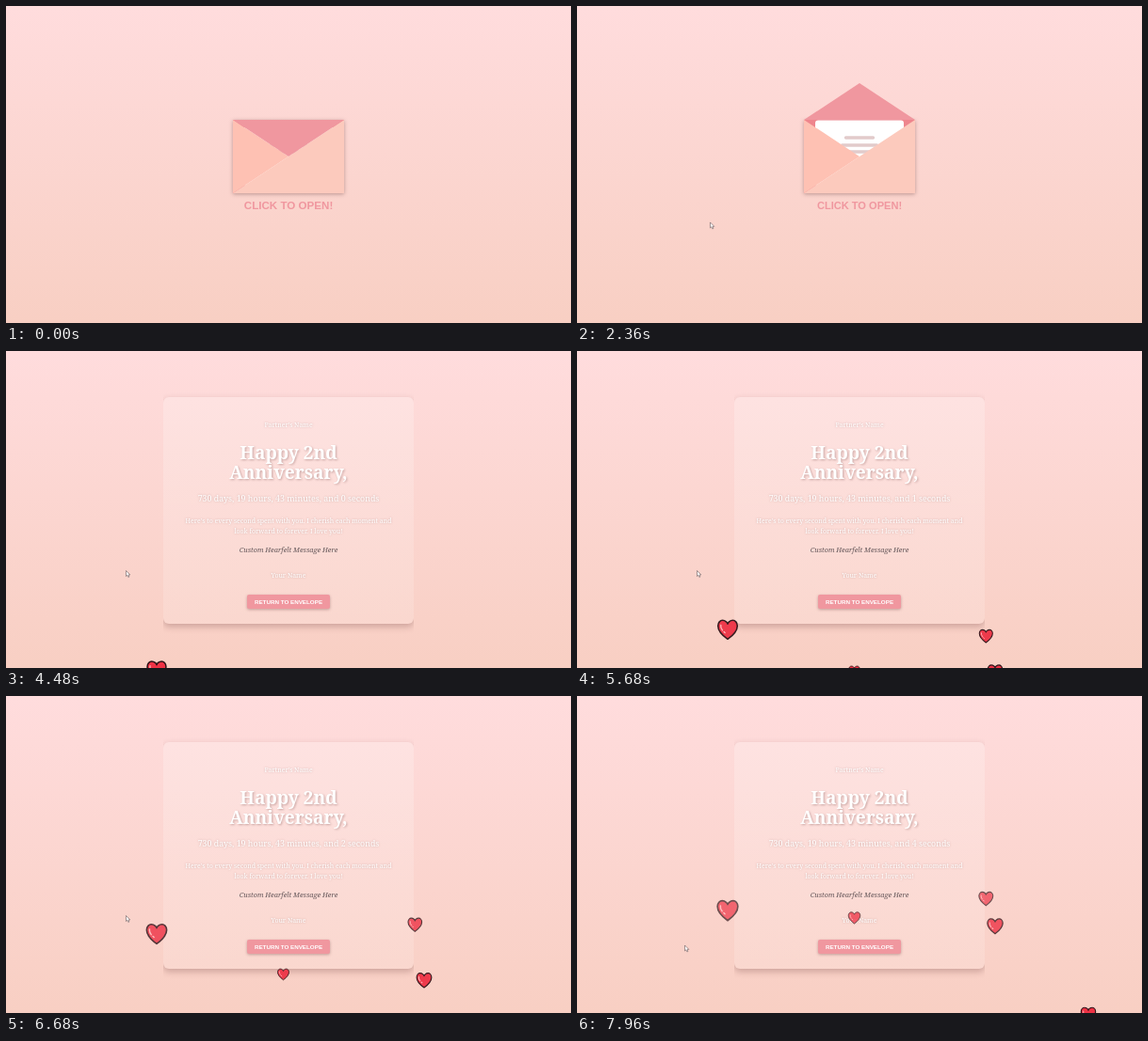
Animation, 600 px wide and 337 px high, one loop 8 s. Source, as an HTML page:

```html
<!DOCTYPE html>
<html lang="en">
<head>
<meta charset="utf-8">
<title>Anniversary envelope</title>
<style>
  html, body { margin: 0; width: 100%; height: 100%; overflow: hidden; }
  body { background: linear-gradient(#ffdcdd, #f8cfc3); }
  #card, svg { position: absolute; left: 0; top: 0; }
  #card {
    left: 167px; top: 49px; width: 266px; height: 241px; border-radius: 6px;
    background: linear-gradient(rgba(255,255,255,.22), rgba(255,255,255,.14));
    box-shadow: 0 3px 7px rgba(90,40,40,.28);
    clip-path: inset(-5px 0 -12px);
  }
  text { text-anchor: middle; font-family: "Noto Serif", serif; fill: #fff; }
  .sans { font: bold 11.05px "Liberation Sans", Arial, sans-serif; }
  .soft { filter: drop-shadow(.5px .8px .8px rgba(90,40,40,.28)); }
  .title { font-size: 19.2px; font-weight: bold; filter: drop-shadow(1px 1px 1px rgba(90,40,40,.32)); }
  .small { font-size: 6.94px; }
</style>
</head>
<body>
<div id="card"></div>
<svg width="600" height="337" viewBox="0 0 600 337">
  <defs>
    <g id="heart">
      <path d="M0 9C-14-1-9-9-5-9C-2-9 0-6.5 0-5.5C0-6.5 2-9 5-9C9-9 14-1 0 9Z"
            fill="#ee3245" stroke="#2b1015" stroke-width="1.4" stroke-linejoin="round"/>
      <path d="M-6.5-4.5Q-7-2-5 .5M-3.5 2L-2.5 3" fill="none" stroke="#ffb9bd" stroke-width="1.2" stroke-linecap="round"/>
    </g>
  </defs>

  <g id="envelope">
    <rect x="241" y="121" width="118" height="78" fill="#ee858d" style="filter:drop-shadow(0 1.5px 2px rgba(90,50,50,.4))"/>
    <rect x="253" y="121.5" width="94" height="70" rx="3" fill="#fff"/>
    <path d="M285.5 140H314.5M281.5 148H318.5M285.5 155H314.5" stroke="#e2cbcb" stroke-width="3.4" stroke-linecap="round"/>
    <path d="M359 121V199H241L300 160Z" fill="#fccabd"/>
    <path d="M241 121L300 160L241 199Z" fill="#fec1b3"/>
    <path id="flap" fill="#f0979f"/>
    <text id="hint" class="sans" y="4" style="fill:#f0979f">CLICK TO OPEN!</text>
  </g>

  <g id="message">
    <text class="soft small" x="300" y="81">Partner's Name</text>
    <text class="title" x="300" y="114.5">Happy 2nd</text>
    <text class="title" x="300" y="136">Anniversary,</text>
    <text class="soft" id="timer" x="300" y="160" font-size="8.9"></text>
    <text class="soft small" x="300" y="183">Here's to every second spent with you. I cherish each moment and</text>
    <text class="soft small" x="300" y="194.3">look forward to forever. I love you!</text>
    <text x="300" y="214" font-size="7.3" font-style="italic" style="fill:#635659">Custom Hearfelt Message Here</text>
    <text class="soft small" x="300" y="241">Your Name</text>
    <rect x="256" y="259" width="88" height="15" rx="2" fill="#f0979f" style="filter:drop-shadow(0 1px 1.5px rgba(90,40,40,.35))"/>
    <text class="sans" x="300" y="268.8" style="font-size:6.25px">RETURN TO ENVELOPE</text>
  </g>

  <g id="hearts"></g>
  <path id="cursor" d="M0 0V6L1.4 4.8L2.4 7L3.4 6.5L2.5 4.4H4.3Z" fill="#fff" stroke="#6b5a5c" stroke-width=".6"/>
</svg>
<script>
const LOOP = 8000, CLICK = 1560, SWITCH = 2560;
const $ = id => document.getElementById(id);
const clamp = v => Math.min(1, Math.max(0, v));

// CSS-style cubic-bezier timing, solved by bisection
function bezier(x1, y1, x2, y2) {
  const at = (a, b, s) => 3 * a * s * (1 - s) ** 2 + 3 * b * s * s * (1 - s) + s ** 3;
  return x => {
    let lo = 0, hi = 1;
    for (let i = 0; i < 20; i++) {
      const mid = (lo + hi) / 2;
      if (at(x1, x2, mid) < x) lo = mid; else hi = mid;
    }
    return at(y1, y2, lo);
  };
}
const ease = bezier(.25, .1, .25, 1);
const easeInOut = bezier(.42, 0, .58, 1);

const hearts = [
  { x: 160, width: 21.3, start: 3600, span: 4500, from: 349, rise: 121, shown: 4160 },
  { x: 434.3, width: 14.6, start: 4000, span: 3850, from: 359.6, rise: 144 },
  { x: 444, width: 16.3, start: 4480, span: 5000, from: 358, rise: 140 },
  { x: 294.5, width: 12.4, start: 4580, span: 4500, from: 358, rise: 140 },
  { x: 543, width: 16.3, start: 6800, span: 4500, from: 358, rise: 140 }
];
for (const heart of hearts) {
  heart.node = document.createElementNS("http://www.w3.org/2000/svg", "use");
  heart.node.setAttribute("href", "#heart");
  $("hearts").append(heart.node);
}

// time, x, y
const cursorPath = [
  [600, 296, 136], [1200, 288, 152], [1560, 262, 186], [1680, 245, 196], [1880, 221.5, 205],
  [2160, 165, 224], [2480, 127.5, 233.5], [7400, 127.5, 233.5], [7560, 125, 239], [7960, 114.5, 265]
];
function cursorAt(t) {
  const i = cursorPath.findIndex(p => p[0] > t);
  if (i < 0) return cursorPath.at(-1).slice(1);
  const [t0, x0, y0] = cursorPath[Math.max(0, i - 1)], [t1, x1, y1] = cursorPath[i];
  const k = t1 > t0 ? (t - t0) / (t1 - t0) : 0;
  return [x0 + (x1 - x0) * k, y0 + (y1 - y0) * k];
}

function draw(t) {
  const tip = 121 + 39 * Math.cos(Math.PI * ease(clamp((t - CLICK) / 1000)));
  $("flap").setAttribute("d", `M241 121H359L300 ${tip}Z`);
  const pulse = 1.025 + .025 * Math.cos(t / 1500 * 2 * Math.PI);
  $("hint").setAttribute("transform", `translate(300 212) scale(${pulse})`);
  $("envelope").style.display = t < SWITCH ? "" : "none";

  const shown = t < SWITCH ? 0 : clamp((t - SWITCH + 40) / 240);
  $("card").style.opacity = $("message").style.opacity = shown;
  const total = 43 * 60 + Math.floor((t - 3720) / 1000);
  $("timer").textContent =
    `730 days, 19 hours, ${Math.floor(total / 60)} minutes, and ${total % 60} seconds`;

  for (const h of hearts) {
    const p = easeInOut(clamp((t - h.start) / h.span));
    const scale = h.width / 20 * (1 + .1 * p);
    h.node.setAttribute("transform", `translate(${h.x} ${h.from - h.rise * p}) scale(${scale})`);
    h.node.style.opacity = t < (h.shown ?? h.start) ? 0 : 1 - .32 * p * p;
  }

  $("cursor").setAttribute("transform", `translate(${cursorAt(t)})`);
  $("cursor").style.display = t < cursorPath[0][0] ? "none" : "";
}

const begin = performance.now();
function tick() {
  draw((performance.now() - begin) % LOOP);
  requestAnimationFrame(tick);
}
tick();
</script>
</body>
</html>
```
